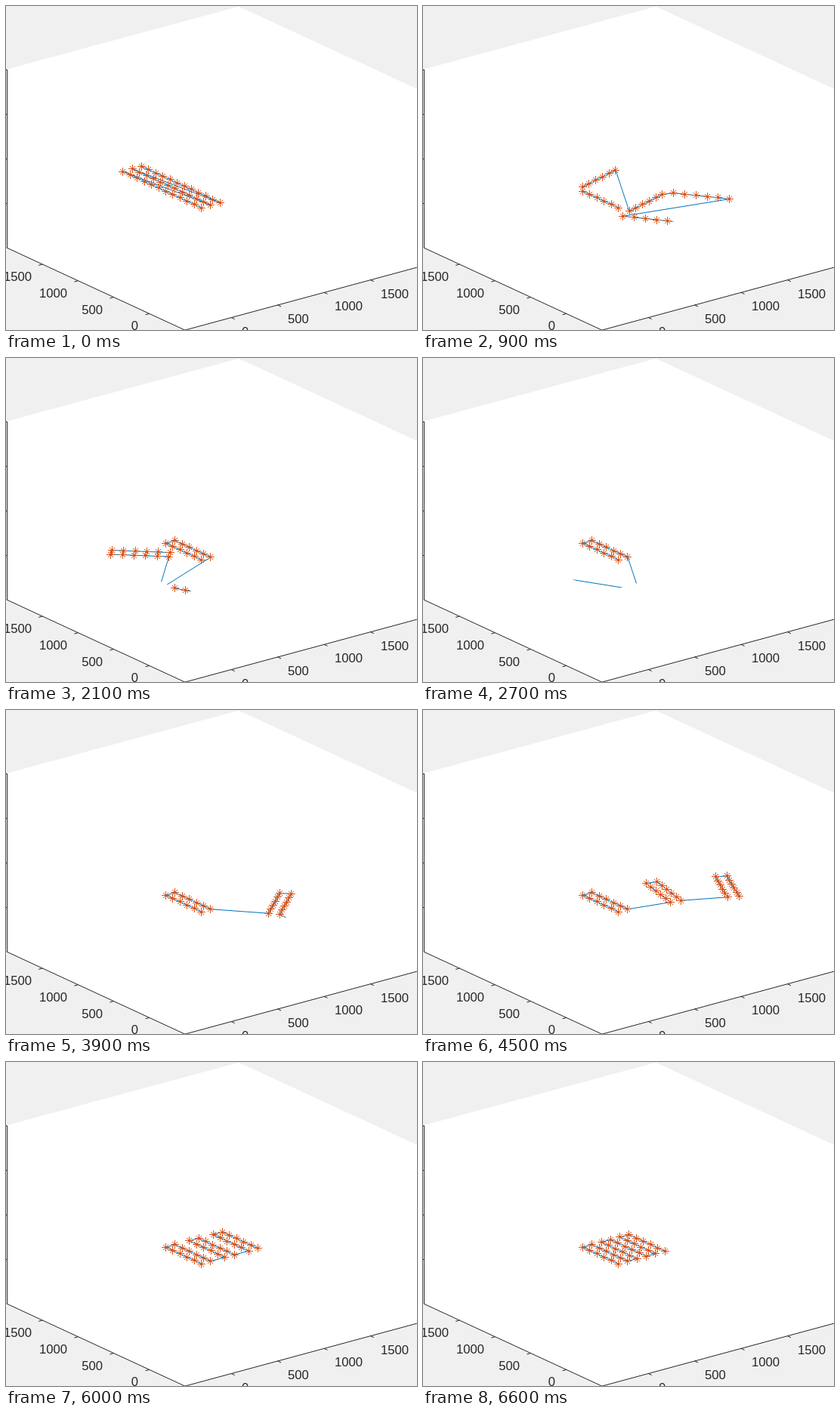
An HTML page that plays this animation: 544 px wide and 429 px high, repeating every 6.9 s.

```html
<!DOCTYPE html>
<html lang="en">
<head>
<meta charset="utf-8">
<title>Folding chain</title>
<style>
  html, body { margin: 0; width: 100%; height: 100%; overflow: hidden; background: #f0f0f0; }
  svg { display: block; }
  text { font: 16.67px "Liberation Sans", Arial, sans-serif; fill: #262626; }
  path { fill: none; stroke-width: 1; }
  #axes { stroke: #262626; }
  #chain { stroke: #0072bd; }
  #stars { stroke: #d95319; shape-rendering: crispEdges; }
</style>
</head>
<body>
<svg width="544" height="429" viewBox="0 0 544 429">
  <clipPath id="box"><polygon id="plane"/></clipPath>
  <g transform="translate(.5 .5)">
    <polygon id="walls" fill="#fff"/>
    <path id="axes"/>
    <g clip-path="url(#box)"><path id="chain"/></g>
    <path id="stars"/>
  </g>
  <g id="labels"></g>
</svg>
<script>
const $ = id => document.getElementById(id);
const LOOP = 6900, STEP = 300, HALF = 6, GROUPS = 3;
const MIN = -5, MAX = 20, LIFT = 118.2;

// Units of 100; z is -1 on the floor, 0 on the chain's plane, 1 at the top.
const project = ([x, y, z = 0]) => [
  236.34 + 12.28 * (x - MIN) - 9.43 * (y - MIN),
  310.45 - 3.32 * (x - MIN) - 4.36 * (y - MIN) - LIFT * z
];
const inside = p => p.every(v => v > MIN - 0.01 && v < MAX);
const polyline = points => "M" + points.map(p => p.map(v => v.toFixed(2)).join()).join("L");

function drawAxes() {
  const left = [MIN, MAX, -1], front = [MIN, MIN, -1], right = [MAX, MIN, -1];
  const top = ([x, y]) => [x, y, 1];
  const [edge, base] = project(left).map(Math.round);
  let d = polyline([left, front, right].map(project)) + `M${edge},${base}V${base - 2 * LIFT}`;
  let labels = "";
  const label = (x, y, anchor, value) =>
    labels += `<text x="${Math.round(x)}" y="${Math.round(y)}" text-anchor="${anchor}">${value}</text>`;

  for (let k = 1; k <= 4; k++) {
    const at = MIN + 5 * k, value = (k - 1) * 500;
    const [rx, ry] = project([at, MIN, -1]);
    const [lx, ly] = project([MIN, at, -1]);
    d += `M${rx},${ry}l4.5,2M${lx},${ly}l-5,1.4`;
    d += `M${edge},${Math.round(base - LIFT / 2 * k)}h-3`;
    label(rx + 14.2, ry + 24.5, "start", value);
    label(lx - 14, ly + 22.5, "end", value);
  }
  $("axes").setAttribute("d", d);
  $("labels").innerHTML = labels;
  $("walls").setAttribute("points",
    [left, front, right, top(right), [MAX, MAX, 1], top(left)].map(project).join(" "));
  $("plane").setAttribute("points",
    [[MIN, MIN], [MIN, MAX], [MAX, MAX], [MAX, MIN]].map(project).join(" "));
}

// Joint angles are in degrees, clockwise from the +y axis.
function chainAt(n) {
  const fold = Math.min(90, 18 * n);
  const start = 180 - Math.atan(1 / 11) * 180 / Math.PI;
  const leave = Math.max(-90, start - 18 * n);
  const arrive = Math.min(-90, -start + 18 * n);
  const linkLength = Math.max(1, Math.hypot(1, 11) - 0.5 * n);

  let x = 1, y = 0.5, heading = 0;
  const points = [[x, y]];
  const move = (length = 1) => {
    const a = heading * Math.PI / 180;
    x += length * Math.sin(a);
    y += length * Math.cos(a);
    points.push([x, y]);
  };
  const run = () => { for (let i = 1; i < HALF; i++) move(); };

  for (let g = 0; g < GROUPS; g++) {
    if (g) {
      heading += leave;
      move(linkLength);
      heading += arrive;
    }
    run();
    heading += fold;
    move();
    heading += fold;
    run();
  }
  return points;
}

function star(point) {
  const [x, y] = project(point).map(Math.round);
  return `M${x - 5.4},${y}h10.8M${x},${y - 5.4}v10.8` +
    `M${x - 3.6},${y - 3.6}l7.2,7.2M${x - 3.6},${y + 3.6}l7.2,-7.2`;
}

function render(time) {
  const n = Math.max(0, Math.floor((time % LOOP) / STEP) - 1);
  const points = chainAt(n);
  $("chain").setAttribute("d", polyline(points.map(project)));
  $("stars").setAttribute("d", points.filter(inside).map(star).join(""));
}

drawAxes();
const begin = performance.now();
function tick() {
  render(performance.now() - begin);
  requestAnimationFrame(tick);
}
tick();
</script>
</body>
</html>
```
